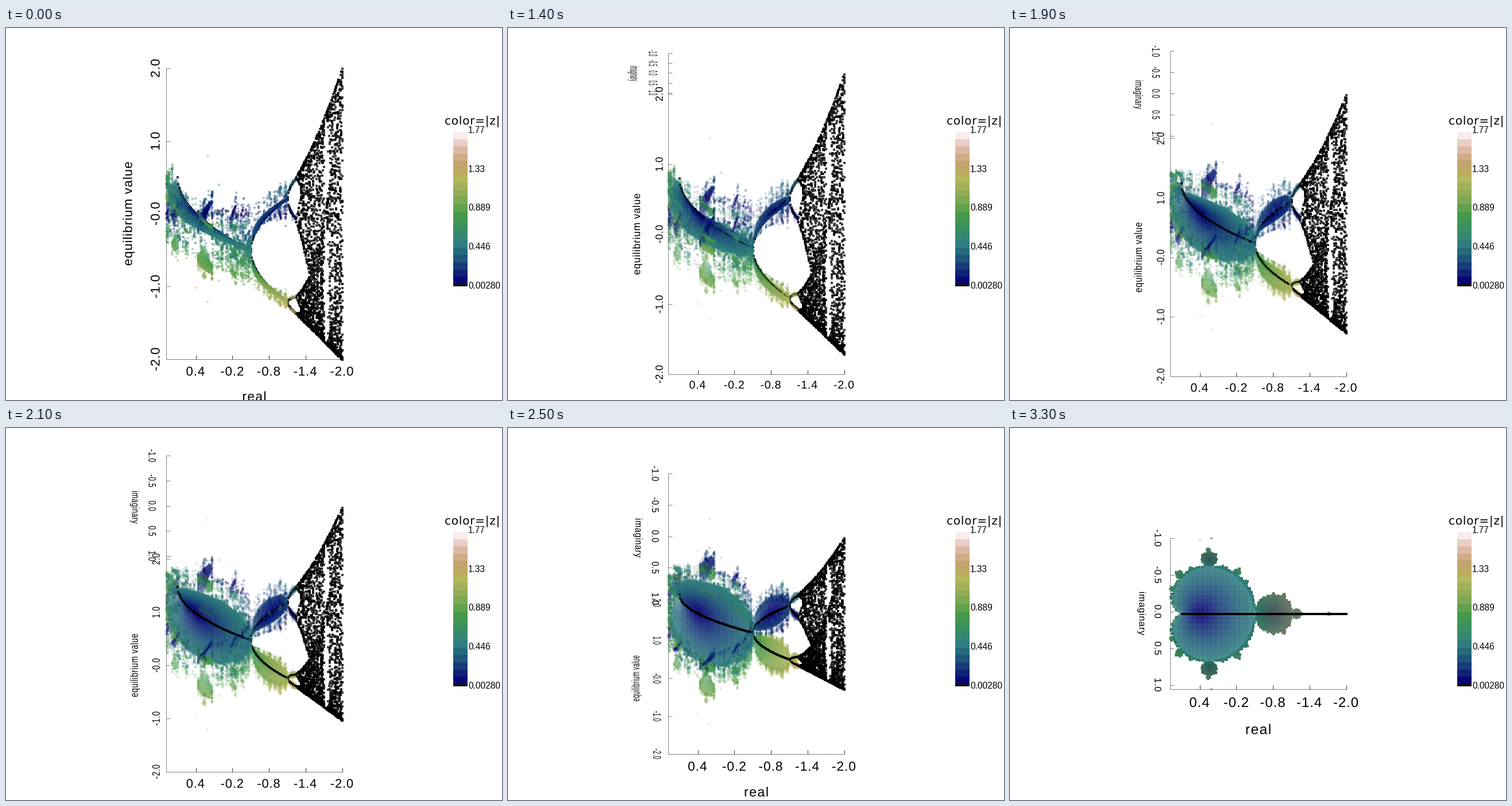
Recreate the animation shown at these times as a matplotlib script. Size 864 px wide and 648 px high, loop 4.4 s.

```python
import numpy as np
import matplotlib.pyplot as plt
from matplotlib.animation import FuncAnimation
from matplotlib.collections import LineCollection
from matplotlib.patches import PathPatch, Rectangle
from matplotlib.path import Path
from matplotlib.textpath import TextPath
from matplotlib.transforms import Affine2D

W, H, DPI = 864, 648, 100
STEP_MS, FRAMES = 100, 44
HOLD, TURNS = 10, 23          # still frames first, then steps to a quarter turn
X0, YC, UNIT = 331, 323.5, 128
LEFT, RIGHT = 278.5, 585.5
Z_MAX, IM_MAX = 1.98, 1.03
CLIM = (0.0028, 1.77)
CMAP = plt.get_cmap("gist_earth")
FONT = {"family": "Liberation Sans"}


# ---------- the Mandelbrot orbits ----------

def settle(c, steps):
    """Drop the values of c that escape; return the rest with their last z."""
    z = np.zeros_like(c)
    for _ in range(steps):
        z = z * z + c
        keep = np.abs(z) < 2.01
        c, z = c[keep], z[keep]
    return c, z


def orbit(c, z, count):
    rows = [z]
    for _ in range(count - 1):
        z = z * z + c
        rows.append(z)
    return np.array(rows)


def cycles(max_period=24):
    """One full cycle of z for every c off the real axis."""
    re = np.arange(-199, 46) / 100
    im = np.arange(-103, 104) / 100
    im = im[im != 0]
    grid = (re[:, None] + 1j * im[None, :]).ravel()
    c, z = settle(grid, 1000)
    rows = orbit(c, z, max_period + 1)
    back = np.abs(rows[1:] - rows[0]) < 0.004
    period = np.where(back.any(axis=0), back.argmax(axis=0) + 1, max_period)
    use = np.arange(max_period)[:, None] < period
    c_all = np.broadcast_to(c, use.shape)
    return c_all.T[use.T], rows[:-1].T[use.T]


def real_line(count=46):
    """Bifurcation diagram along the real axis."""
    c, z = settle(np.arange(-199, 26) / 100, 1000)
    rows = np.round(orbit(c, z, count), 3)
    pairs = [(a, v) for a, col in zip(c, rows.T) for v in np.unique(col)]
    return np.array(pairs).T


# ---------- projection ----------

def px(re):
    return X0 - UNIT * re


def py(z, im, cos, sin):
    return YC - UNIT * z * cos + UNIT * im * sin


# ---------- text ----------

def text_path(s, track=0.04, font=FONT):
    """Outline of s at size 1, centred on its own box, y pointing down."""
    def extent(t):
        return TextPath((0, 0), t + "|", size=100, prop=font).get_extents().x1

    start = extent("")
    parts = []
    for i, ch in enumerate(s):
        if ch != " ":
            glyph = TextPath((0, 0), ch, size=100, prop=font)
            shift = extent(s[:i]) - start + 100 * track * i
            parts.append(Path(glyph.vertices + [shift, 0], glyph.codes))
    path = Path.make_compound_path(*parts)
    box = path.get_extents()
    middle = [(box.x0 + box.x1) / 2, 36]
    return Path((path.vertices - middle) * [0.01, -0.01], path.codes)


class Label:
    def __init__(self, s, **kw):
        self.patch = PathPatch(text_path(s, **kw), fc="black", lw=0, zorder=3)
        ax.add_patch(self.patch)

    def place(self, x, y, size, turn=0, squash=1):
        self.patch.set_visible(squash > 0.01)
        move = Affine2D().scale(size * max(squash, 0.01), size)
        move.rotate_deg(turn).translate(x, y)
        self.patch.set_transform(move + ax.transData)


# ---------- stage ----------

fig = plt.figure(figsize=(W / DPI, H / DPI), dpi=DPI, facecolor="white")
ax = fig.add_axes([0, 0, 1, 1])
ax.set_xlim(0, W)
ax.set_ylim(H, 0)
ax.axis("off")

c_pts, z_pts = cycles()
c_line, z_line = real_line()
front = c_pts.imag > 0.035


class Cloud:
    """Square dots, 4 px wide, at (re, im, z)."""

    def __init__(self, re, im, z, zorder, **kw):
        self.x, self.im, self.z = np.round(px(re)), im, z
        self.dots = ax.scatter(self.x, self.x, s=(4 * 72 / DPI) ** 2,
                               marker="s", linewidths=0, antialiaseds=False,
                               zorder=zorder, **kw)

    def turn(self, cos, sin):
        y = np.round(py(self.z, self.im, cos, sin))
        self.dots.set_offsets(np.column_stack([self.x, y]))


def colour_cloud(mask, zorder):
    c, z = c_pts[mask], z_pts[mask]
    return Cloud(c.real, c.imag, z.real, zorder, c=np.abs(z), cmap=CMAP,
                 vmin=CLIM[0], vmax=CLIM[1], alpha=0.19)


clouds = [
    colour_cloud(~front, 4),
    Cloud(c_line, 0 * c_line, z_line, 5, color="black", alpha=0.75),
    colour_cloud(front, 6),
]

frame_lines = LineCollection([], colors="0.5", linewidths=0.72, zorder=2)
real_ticks = LineCollection([], colors="0.2", linewidths=0.72, zorder=2)
ax.add_collection(frame_lines)
ax.add_collection(real_ticks)

TICK_X = np.linspace(330.5, RIGHT, 5)
real_labels = [Label(f"{0.4 - 0.6 * i:.1f}") for i in range(5)]
z_labels = [Label(s) for s in ("2.0", "1.0", "-0.0", "-1.0", "-2.0")]
im_labels = [Label(f"{-1 + 0.5 * i:.1f}") for i in range(5)]
real_title = Label("real", track=0.06)
z_title = Label("equilibrium value")
im_title = Label("imaginary")


def colour_bar():
    x, top, bottom, bands = 779, 181, 450, 64
    step = (bottom - top) / bands
    edges = [0, *range(1, bands + 1, 3)]
    for lo, hi in zip(edges, edges[1:]):
        tone = "#101014" if lo == 0 else CMAP((lo + hi) / 2 / bands)
        ax.add_patch(Rectangle((x, bottom - hi * step), 25, (hi - lo) * step,
                               fc=tone, lw=0, antialiased=False))
    ticks = ("0.00280", "0.446", "0.889", "1.33", "1.77")
    for i, s in enumerate(ticks):
        ax.text(805, 448 - 67.75 * i, s, size=15.5 * 72 / DPI,
                family="Liberation Sans", va="center_baseline")
    Label("color=|z|", track=0.04, font={"family": "DejaVu Sans"}).place(
        811.5, 161, 20)


colour_bar()


# ---------- motion ----------

KEYS = [0, 1, 7, 11, 15, 19, 23]


def keyed(k, *values):
    return np.interp(k, KEYS, values)


def draw(n):
    k = min(max(n - HOLD, 0), TURNS)
    angle = np.pi / 2 * k / TURNS
    cos, sin = np.cos(angle), np.sin(angle)
    if k == TURNS:
        cos = 0.0

    for cloud in clouds:
        cloud.turn(cos, sin)

    top = py(Z_MAX, -IM_MAX, cos, sin)
    base = py(-Z_MAX, IM_MAX, cos, sin)
    im_y = top + UNIT * sin * 0.5 * np.arange(5)
    z_y = py(Z_MAX * np.linspace(1, -1, 5), IM_MAX, cos, sin)

    lines = [[(LEFT, top), (LEFT, base)], [(LEFT, base), (RIGHT, base)]]
    lines += [[(LEFT, y), (LEFT + 7, y)] for y in (*im_y, *z_y)]
    frame_lines.set_segments(lines)
    real_ticks.set_segments([[(x, base), (x, base - 7)] for x in TICK_X])

    # horizontal axis
    size = keyed(k, 0.93, 0.78, 0.85, 0.91, 0.95, 0.98, 1)
    for label, x in zip(real_labels, TICK_X):
        label.place(x - 0.5, base + 22 * size, 24 * size)
    real_title.place(432.5, base + 69 * size, 24.5 * size)

    # equilibrium axis, flattened as it tips away
    size = 24 * keyed(k, 0.93, 0.75, 0.76, 0.775, 0.79, 0.82, 0.83)
    x = keyed(k, 259.5, 263, 263, 261, 260, 259, 259)
    for label, y in zip(z_labels, z_y):
        label.place(x, y, size, -90 if k < 13 else 90, cos)
    x = keyed(k, 211.5, 224, 223, 223, 222, 219, 218)
    z_title.place(x, (z_y[0] + z_y[-1]) / 2, size, -90, cos)

    # imaginary axis, unfolding
    size = 16.4 * keyed(k, 1.4, 1.4, 1.2, 1.1, 1.05, 1, 1)
    x = keyed(k, 252, 252, 254, 255, 257, 258, 258)
    for label, y in zip(im_labels, im_y):
        label.place(x, y, size, 90, sin)
    x = keyed(k, 217, 217, 224, 226, 228, 230, 231)
    im_title.place(x, (top + z_y[0]) / 2, size, 90, sin)
    return []


anim = FuncAnimation(fig, draw, frames=FRAMES, interval=STEP_MS,
                     init_func=lambda: draw(0), repeat=True, repeat_delay=0)
plt.show()
```
